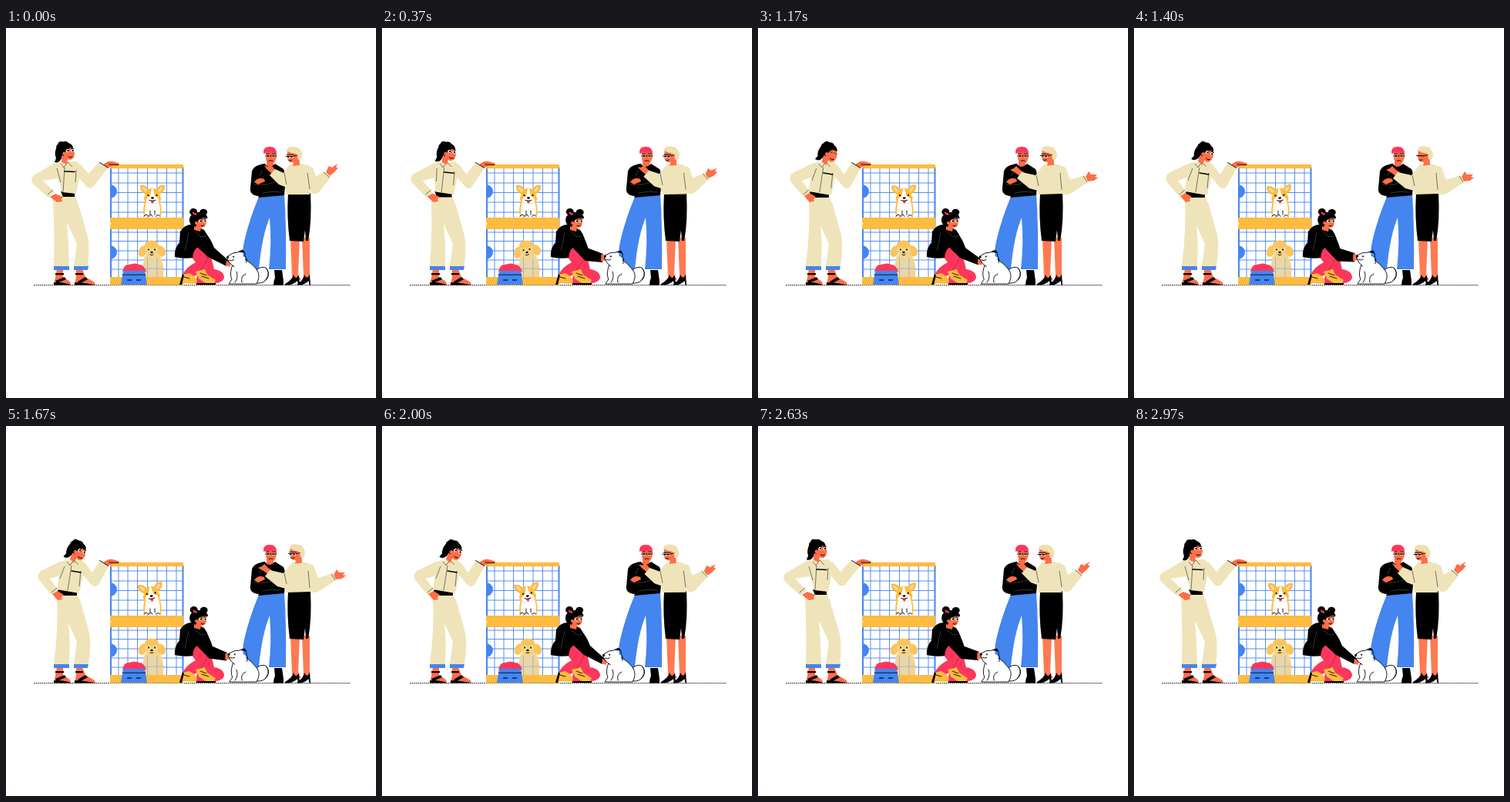
Animation, 480 px wide and 480 px high, one loop 3000 ms. Source, as an HTML page:

```html
<!DOCTYPE html>
<html lang="en">
<head>
<meta charset="utf-8">
<title>Pet adoption</title>
<style>
html, body { margin: 0; width: 100%; height: 100%; overflow: hidden; background: #fff; }
svg { display: block; width: 100vw; height: 100vh; }
.ink { fill: #000; }
.skin { fill: #fe6e47; }
.leg { fill: #fe7a52; }
.cream { fill: #efe4b9; }
.blue { fill: #4485ef; }
.gold { fill: #fdbb40; }
.pink { fill: #fc375c; }
.white { fill: #fff; }
.line { fill: none; stroke: #000; stroke-width: .9; stroke-linecap: round; stroke-linejoin: round; }
.seam { fill: none; stroke: #34433b; stroke-width: .7; }
.mesh { fill: none; stroke: #4485ef; stroke-width: .9; }
</style>
</head>
<body>
<svg viewBox="0 0 480 480">
  <path class="line" d="M36 333.6H447" stroke-dasharray="1.6 1" style="stroke-linecap:butt"/>

  <g id="cage">
    <path class="blue" d="M135 203a8.5 8.5 0 0 1 0 18zM135 282a8.5 8.5 0 0 1 0 18z"/>
    <path class="mesh" id="mesh"/>
    <path class="blue" d="M135 180h2v152h-2zM228.5 180h2v152h-2z"/>
    <path class="gold" d="M135 177h95v5.3h-95zM135 246h95v15h-95zM135 323h95v10.5h-95z"/>
    <path class="white" d="M134 252l3 2-3 2z"/>
  </g>

  <g id="corgi">
    <path class="gold" d="M180 225Q177 236 179 244H201Q203 234 199 224Z"/>
    <path class="white" d="M182 224Q179 236 181 245H199Q201 235 198 224Z"/>
    <path class="line" d="M179 244.5q3-5 6 0M185 244.5q3-5 5 0M194 244.5q3-4 6 0M187 237v5M193 237v5" stroke-width=".7"/>
    <g id="corgiHead">
      <path class="gold" d="M181 216Q173 212 174 204Q181 203 185 209Q190 206 195 209Q199 203 206 204Q207 212 199 216Q203 222 199 226Q190 231 181 226Q177 222 181 216Z"/>
      <path d="M176.500 206Q180 206 183 211L181 213Q177 210 176.500 206ZM203.500 206Q200 206 197 211L199 213Q203 210 203.500 206Z" fill="#f7d9a0"/>
      <path class="white" d="M189 208h2L193 218Q200 221 198 226Q190 231 182 226Q180 221 187 218Z"/>
      <circle class="ink" cx="184.500" cy="217" r="1.100"/><circle class="ink" cx="195.500" cy="217" r="1.100"/>
      <ellipse class="ink" cx="190" cy="220.500" rx="2" ry="1.300"/>
      <path class="pink" d="M188 224h4Q192 227.500 190 227.500T188 224Z"/>
      <path class="line" d="M186 223.500Q190 225 194 223.500" stroke-width=".7"/>
    </g>
  </g>

  <g id="poodle">
    <path d="M180 295Q176 310 179 323H204Q206 306 199 294Z" fill="#f0d596"/>
    <path d="M185 296Q181 310 184 323H196Q199 308 194 296Z" fill="#e8d6a8"/>
    <g id="poodleHead">
      <path d="M182 282Q174 281 172 290Q171 297 176 297Q181 296 183 289ZM196 282Q204 281 207 289Q208 296 202 297Q197 295 195 289Z" fill="#fbc55d"/>
      <path d="M181 284Q179 276 189 276Q199 276 197 285Q199 293 194 297Q189 300 184 297Q179 292 181 284Z" fill="#f2d48a"/>
      <path d="M181 284Q178 276 189 275.500Q200 276 197 284Q189 287 181 284Z" fill="#fbc55d"/>
      <circle class="ink" cx="185" cy="287.500" r="1"/><circle class="ink" cx="193" cy="287.500" r="1"/>
      <ellipse class="ink" cx="189" cy="291" rx="1.700" ry="1.200"/>
      <path class="line" d="M187 294Q189 295.500 191 294" stroke-width=".6"/>
    </g>
    <path class="mesh" d="M183.500 298V323M196 298V323M176 312H205" opacity=".45"/>
  </g>

  <g id="bowl">
    <path class="pink" d="M151 316Q153 306 160 307Q167 304 173 307Q179 307 182 316Z"/>
    <path class="blue" d="M152 315H180L183 333H149Z"/>
    <path d="M151 319.500H181V321H151ZM157 326h6v2h-6zM169 326h6v2h-6z" fill="#173a78"/>
  </g>

  <g id="keeper">
    <path class="skin" d="M66 313h8v10l9 6 1 4H62l2-9ZM91 313h8l4 10 12 7 1 3H89l2-10Z"/>
    <path class="ink" d="M62 330Q73 329 85 333.500H62ZM89 330Q102 330 116 333.500H89ZM64 318h11v2.200H64ZM90 318h10v2.200H90ZM64 328l12-5 2 3-12 5ZM93 329l10-6 3 3-11 6Z"/>
    <path class="blue" d="M62 308h20v6H62ZM88 308h19l-1 6H88Z"/>
    <path class="cream" id="trousers"/>
    <path class="ink" id="belt"/>
    <path class="cream" id="armBack"/>
    <path class="cream" id="shirt"/>
    <path class="cream" id="armFront"/>
    <path class="seam" id="shirtSeams"/>
    <path class="line" id="pocket" style="stroke-width:1.500"/>
    <path class="skin" id="hipHand"/>
    <path class="skin" d="M126 177Q134 171 140 173.500L147 175.500L146 178L138 179L132 181.500Z"/>
    <path class="line" d="M121.500 174.500L132.500 181.500M134 177L146 177.500"/>
    <g id="keeperHead">
      <path class="ink" d="M66 154Q62 162 65 169L63 174Q69 176 72 169L75 157Z"/>
      <path class="skin" d="M73 154H86L89 162L88 168Q84 173 80 170L79 177L72 174Z"/>
      <path class="ink" d="M66 157Q64 153 67 151Q68 146 74 147.500Q79 146 81 149Q87 151 87 156Q81 154 78 158L75 166Q67 164 66 157Z"/>
      <circle class="skin" cx="75.500" cy="163" r="2.300"/>
      <g id="keeperEyes"></g>
      <path class="line" d="M81 167Q84 169 86 167" stroke-width=".7"/>
    </g>
  </g>

  <g id="kneeler">
    <path class="ink" d="M219 297Q218 286 225 278L226 264Q232 254 243 255L257 262Q265 272 263 284L245 298Q229 300 219 297Z"/>
    <path class="pink" d="M242 299Q243 284 253 283Q265 284 266 296L270 313Q283 315 283 324Q281 332 266 331L246 331L248 320L230 329L229 320Q234 310 246 304Z"/>
    <path class="seam" d="M263 293Q260 307 248 319" style="stroke:#b91c40"/>
    <path class="gold" d="M246 316L258 313L261 320L272 327L270 331H259L250 325ZM229 320L238 318L244 322L248 328L246 332L228 331Z"/>
    <path class="line" d="M252 318l8 3M254 322l9 3M231 323l7 2"/>
    <path class="ink" d="M229 319L231 321L228 333H225ZM247 331H272V333H247Z"/>
    <path class="ink" id="petArm"/>
    <path class="seam" d="M237 266L232 289M246 265Q252 273 260 270" style="stroke:#3c574c"/>
    <path class="skin" id="petHand"/>
    <g id="kneelerHead">
      <ellipse class="ink" cx="243.500" cy="238.500" rx="5" ry="4.500"/><ellipse class="ink" cx="256.500" cy="239" rx="5" ry="4.200"/>
      <path class="skin" d="M244 246H259L260 253Q258 260 253 259L252 264L244 262Z"/>
      <path class="ink" d="M238 249Q239 239 250 239Q261 239 262 247Q254 245 250 249L246 258Q238 256 238 249Z"/>
      <path class="pink" d="M242 238l6 3-1 2-4-1.500Z"/>
      <circle class="skin" cx="247" cy="253" r="2"/>
      <g id="kneelerEyes"></g>
      <path class="line" d="M253 256.500Q255 258 257 256" stroke-width=".7"/>
    </g>
  </g>

  <g id="friend">
    <path class="blue" d="M328 219L361 215Q364 260 363 313H341Q345 280 342 246Q332 270 328 313H313Q304 296 309 277Q316 247 328 219Z"/>
    <path class="ink" d="M348 314H358L360 328V333.500H347Q347 328 349 324Z"/>
    <path class="skin" d="M337 160H351Q352 170 347 176V181H338V173Q336 167 337 160Z"/>
    <path class="ink" d="M319 186Q321 178 336 176Q341 184 349 176L360 183Q364 190 361 217L327 220L328 218Q316 217 317 208Z"/>
    <path class="seam" d="M322 203Q338 205 351 199M333 214Q345 211 357 213M333 184l-4 8" style="stroke:#3c574c"/>
    <path class="skin" d="M322 200Q327 193 335 196L336 199L327 203Z"/>
    <path class="pink" d="M334 163Q333 154 342 154Q351 154 351 163Q342 160.500 334 163Z"/>
    <g id="friendEyes"></g>
    <path class="line" d="M337 166h14M341 172.500q2.500-1.500 5 0" stroke-width="1.100"/>
  </g>

  <g id="lady">
    <path class="leg" d="M369 272H381L379 322L383 326L372 331L371 322ZM384 272H394V322L393 328L385 330L386 322Z"/>
    <path class="ink" d="M362 332Q372 326 373 320Q376 328 380 320L381 333.500H379L378 328Q372 334 362 333.500ZM378 332Q386 327 387 320Q391 328 394 319L395 333.500H393.500L392.500 328Q387 334 378 333.500Z"/>
    <path class="ink" d="M366 214H395Q397 250 392 276L389 276L388 262L386 277L368 276Q364 245 366 214Z"/>
    <path class="skin" id="ladyHandBack"/>
    <path class="cream" id="ladyTop"/>
    <path class="cream" id="ladyArm"/>
    <path class="seam" id="ladySeams"/>
    <path class="skin" id="ladyHand"/>
    <g id="ladyHead">
      <path class="skin" d="M365 159H380L381 178L372 179L373 174.500Q366 175 365 169Z"/>
      <path d="M364 159Q365 153.500 373 154Q381 154 383 160Q386 165 383 170Q380 173 378 169L376 163Q370 163 364 159Z" fill="#efdfae"/>
      <circle class="skin" cx="376.500" cy="168" r="2"/>
      <g id="ladyEyes"></g>
      <path class="line" d="M363 166.500H372L378 165M367 172Q369 173 371 171.500" stroke-width=".8"/>
    </g>
  </g>

  <g id="spitz">
    <path class="line" style="fill:#fff" d="M326 313Q331 309 337 311Q343 318 339 325Q334 332 325 331Z"/>
    <path class="line" stroke-dasharray="2 1" d="M338 312Q343 320 336 327"/>
    <path class="line" style="fill:#fff" id="spitzBody"/>
    <path class="line" d="M299 316Q302 324 297 330M306 330Q304 322 311 319" stroke-width=".7"/>
    <g id="spitzHead">
      <path class="white" d="M287 295Q291 291 300 291L311 298L309 310L296 310Q291 303 287 295Z"/>
      <path class="line" d="M296 309Q290 305 288 299Q286 295 291 293.500Q296 290 301 291L308 288.500Q312 291 311 296Q314 300 312 305"/>
      <path class="ink" d="M303 290.500L309 288L311 292Z"/>
      <circle class="ink" cx="288.500" cy="296" r="1.500"/><circle class="ink" cx="296" cy="296" r="1"/>
      <path class="line" d="M290 300Q293 302 296 300" stroke-width=".7"/>
    </g>
  </g>
</svg>
<script>
const LOOP = 3000;
const $ = id => document.getElementById(id);
const smooth = x => x * x * (3 - 2 * x);

// Eased value between [time, value] stops.
function track(t, stops) {
  const i = stops.findIndex(s => s[0] > t);
  if (i < 0) return stops[stops.length - 1][1];
  if (i === 0) return stops[0][1];
  const [t0, a] = stops[i - 1], [t1, b] = stops[i];
  return a + (b - a) * smooth((t - t0) / (t1 - t0));
}

// Blend two paths that share the same commands.
function blend(id, a, b, k) {
  const ends = b.match(/-?[\d.]+/g);
  let i = 0;
  $(id).setAttribute('d', a.replace(/-?[\d.]+/g, n => (+n + (ends[i++] - n) * k).toFixed(2)));
}

const place = (id, value) => $(id).setAttribute('transform', value);
const turn = (id, angle, x, y, dx = 0, dy = 0) =>
  place(id, `translate(${dx} ${dy}) rotate(${angle} ${x} ${y})`);

function addEyes(id, xs, y, gaze) {
  $(id).innerHTML = xs.map(x =>
    `<ellipse class="white" cx="${x}" cy="${y}" rx="2" ry="2"/>` +
    `<circle class="ink" cx="${x + gaze}" cy="${y}" r="1.2"/>`).join('') +
    `<path class="line" d="M${xs[0] - 2} ${y - 2.6}h3.8M${xs[1] - 1.8} ${y - 2.6}h3.8"/>`;
}

function blink(id, y, t, at) {
  const open = Math.min(1, Math.max(.12, Math.abs(t - at) / 100 - .4));
  place(id, `translate(0 ${y * (1 - open)}) scale(1 ${open})`);
}

function drawKeeper(t) {
  const k = track(t, [[0, 0], [700, .95], [1600, 1], [2050, 1], [2650, 0]]);
  blend('trousers',
    'M61 223L72 217L90 218L94 229L106 270Q109 284 106 309L88 309L92 280L79 252L81 280L82 309L62 309Q63 262 61 223Z',
    'M66 222L69 217L92 218L97 229L108 268Q111 284 107 309L88 309L92 280L81 256L83 280L82 309L62 309Q68 262 66 222Z', k);
  blend('belt', 'M71 212L89 213L89 219L74 219Z', 'M66 211L92 215L92 220L68 220Z', k);
  blend('armBack',
    'M70 174L63 175L36 191Q31 196 35 202L55 220L63 213L48 198L68 195Z',
    'M78 174L70 176L45 188Q39 193 43 200L59 219L68 213L57 198L75 192Z', k);
  blend('shirt',
    'M66 174L92 173L98 180L91 215L73 213L66 190Z',
    'M74 175L98 173L103 181L95 217L66 212L69 192Z', k);
  blend('armFront',
    'M90 174L97 177L107 189L121 174L132 182L113 206Q107 210 103 204L91 190Z',
    'M97 174L103 178L112 190L122 174L133 182L120 206Q114 211 110 205L98 191Z', k);
  blend('shirtSeams',
    'M71 176L75 181L80 174L86 180M76 181L74 213M66 182L71 200M54 216L61 210M91 184L90 200',
    'M79 176L83 181L88 174L94 180M85 181L80 213M76 182L70 198M59 216L66 210M97 188L95 208', k);
  blend('pocket', 'M76 186L89 186.500', 'M85 188L97 190', k);
  blend('hipHand',
    'M57 219L64 215L74 219L72 222L73 225L66 226Z',
    'M60 218L67 214L75 219L72 222L73 225L67 226Z', k);
  const nod = track(t, [[0, 0], [370, 8], [770, 18], [1200, 18], [1650, 21], [2050, 20], [2330, 9], [2800, 0]]);
  turn('keeperHead', nod, 80, 172, 11 * k, 1.5 * k);
  blink('keeperEyes', 159, t, 1150);
}

function drawLady(t) {
  const k = track(t, [[0, 0], [100, 0], [700, 1], [1650, 1], [2170, 0]]);
  blend('ladyHandBack',
    'M346 190L338 183L335 178L340 180L343 177L347 181L351 187Z',
    'M344 195L334 188L327 184L332 182L335 179L340 184L346 188Z', k);
  blend('ladyTop',
    'M368 177L384 176L397 181L394 216L364 216L362 206L354 203L342 191L349 183L360 188Z',
    'M371 177L385 176L399 181L395 215L364 216L363 211L352 208L336 195L342 187L360 191Z', k);
  blend('ladyArm',
    'M389 177L398 181L402 193L413 186L421 194L406 213Q399 218 395 212L389 196Z',
    'M389 177L399 181L405 197L424 191L428 200L405 215Q397 218 394 212L389 196Z', k);
  blend('ladySeams',
    'M391 188L394 209M412 187L420 194M361 188L364 203',
    'M392 188L394 210M422 192L427 200M361 191L364 205', k);
  blend('ladyHand',
    'M415 187L419 179L423 181L430 176L428 181L431 181L426 187L420 192Z',
    'M425 193L429 186L432 190L440 190L437 193L441 194L436 198L428 199Z', k);
  turn('ladyHead', 2 * k, 375, 176, 3 * k, -.5 * k);
  blink('ladyEyes', 167, t, 1400);
  blink('friendEyes', 166, t, 770);
}

function drawPetting(t) {
  const lift = (1 - Math.cos(t / 1000 * 2 * Math.PI)) / 2;
  blend('petArm',
    'M250 261Q262 264 270 285L289 302L286 309L262 297L248 284Z',
    'M250 261Q261 264 267 286L286 291L286 303L264 303L248 286Z', lift);
  blend('petHand',
    'M286 302L291 304L291 310L285 308Z',
    'M284 292L290 293L290 300L284 302Z', lift);
  turn('kneelerHead', 2 * lift - 1, 249, 260);
  blink('kneelerEyes', 250.5, t, 770);
  blend('spitzBody',
    'M295 305Q289 318 293 326L289 332L325 332Q331 322 325 313Q318 304 309 300Z',
    'M296 305Q290 318 294 326L290 332L325 332Q331 322 326 315Q319 305 311 300Z', lift);
  turn('spitzHead', -5 + 7 * lift, 304, 306, lift, .5 * lift);
}

function drawPuppies(t) {
  turn('corgiHead', track(t, [[0, 0], [370, 0], [1170, -2], [1670, -8], [2330, -6], [2900, 0]]), 190, 230);
  turn('poodleHead', track(t, [[0, 0], [370, -8], [800, -8], [1250, 0]]), 189, 298);
}

function draw(t) {
  drawKeeper(t);
  drawLady(t);
  drawPetting(t);
  drawPuppies(t);
}

const columns = [146, 158, 170.5, 183.5, 196, 208.5, 221];
const rows = [188, 201, 213.5, 226, 239, 265, 276.5, 289, 301, 313];
$('mesh').setAttribute('d',
  columns.map(x => `M${x} 182V323`).join('') + rows.map(y => `M136 ${y}H229`).join(''));

addEyes('keeperEyes', [80, 86], 159, .5);
addEyes('ladyEyes', [366.5, 371], 167, -.4);
addEyes('friendEyes', [340, 347], 166, 0);
addEyes('kneelerEyes', [252.5, 258], 250.5, .5);

function frame() {
  draw(performance.now() % LOOP);
  requestAnimationFrame(frame);
}
frame();
</script>
</body>
</html>
```
